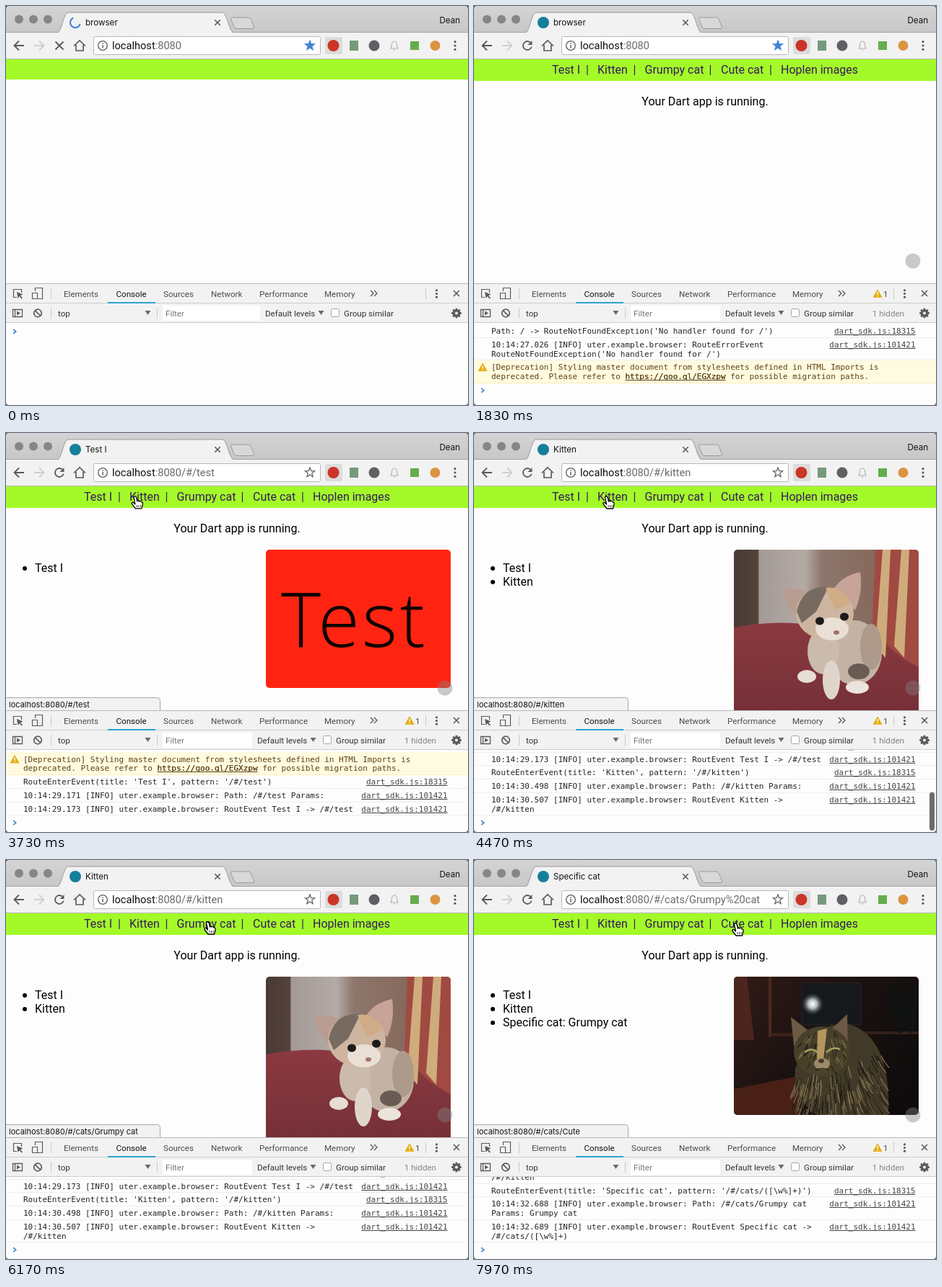
Recreate the animation shown at these times as an HTML page with a canvas. Size 640x554 px, loop 8000 ms.

```html
<!DOCTYPE html>
<html lang="en">
<head>
<meta charset="utf-8">
<title>Router demo</title>
<style>
  html, body { margin: 0; width: 100%; height: 100%; overflow: hidden; background: #fdfdfd; }
  canvas { display: block; width: 640px; height: 554px; }
</style>
</head>
<body>
<canvas id="stage"></canvas>
<script>
const LOOP = 8000;
const W = 640, H = 554;
const canvas = document.getElementById('stage');
const scale = window.devicePixelRatio || 1;
canvas.width = W * scale;
canvas.height = H * scale;
const g = canvas.getContext('2d');

const PAPER = '#fdfdfd', BAR = '#f2f2f2', EDGE = '#b8b8b8', ICON = '#5a5a5a', LINK = '#351a5e';
const UI = '11.6px Roboto, sans-serif';
const TAB = '11.6px Inter, sans-serif';
const STATUS = '11px Inter, sans-serif';
const URL_FONT = '14.6px Roboto, sans-serif';
const PAGE = '16px Roboto, sans-serif';
const MONO = '11px "DejaVu Sans Mono", monospace';

// Moments of the story, in ms
const SHOWN = 780, LOADED = 880, TEST = 3025, KITTEN = 4352, GRUMPY = 6542;

const pages = [
  { at: 0, title: 'browser', path: '' },
  { at: TEST, title: 'Test I', path: '/#/test', item: 'Test I', photo: drawTestCard },
  { at: KITTEN, title: 'Kitten', path: '/#/kitten', item: 'Kitten', photo: drawKitten },
  { at: GRUMPY, title: 'Specific cat', path: '/#/cats/Grumpy%20cat',
    item: 'Specific cat: Grumpy cat', photo: drawGrumpy }
];

const links = [
  ['Test I', 108], ['Kitten', 171], ['Grumpy cat', 236.5], ['Cute cat', 342], ['Hoplen images', 425]
];

const hovers = [
  [2480, '/#/test'], [3760, '/#/kitten'], [5960, '/#/cats/Grumpy cat'], [7560, '/#/cats/Cute']
];

const SDK = 'dart_sdk.js:18315', LOG = 'dart_sdk.js:101421';
const app = 'uter.example.browser:';
const rows = [
  { at: LOADED, text: ["Path: / -> RouteNotFoundException('No handler found for /')"], link: SDK },
  { at: LOADED, text: [`10:14:27.026 [INFO] ${app} RouteErrorEvent`,
    "RouteNotFoundException('No handler found for /')"], link: LOG },
  { at: LOADED, warn: true, text: [
    '[Deprecation] Styling master document from stylesheets defined in HTML Imports is',
    'deprecated. Please refer to https://goo.gl/EGXzpw for possible migration paths.'] },
  { at: TEST, text: ["RouteEnterEvent(title: 'Test I', pattern: '/#/test')"], link: SDK },
  { at: TEST, text: [`10:14:29.171 [INFO] ${app} Path: /#/test Params:`], link: LOG },
  { at: TEST, text: [`10:14:29.173 [INFO] ${app} RoutEvent Test I -> /#/test`], link: LOG },
  { at: KITTEN, text: ["RouteEnterEvent(title: 'Kitten', pattern: '/#/kitten')"], link: SDK },
  { at: KITTEN, text: [`10:14:30.498 [INFO] ${app} Path: /#/kitten Params:`], link: LOG },
  { at: KITTEN, text: [`10:14:30.507 [INFO] ${app} RoutEvent Kitten ->`, '/#/kitten'], link: LOG },
  { at: GRUMPY, text: ["RouteEnterEvent(title: 'Specific cat', pattern: '/#/cats/([\\w%]+)')"], link: SDK },
  { at: GRUMPY, text: [`10:14:32.688 [INFO] ${app} Path: /#/cats/Grumpy cat`, 'Params: Grumpy cat'], link: LOG },
  { at: GRUMPY, text: [`10:14:32.689 [INFO] ${app} RoutEvent Specific cat ->`, '/#/cats/([\\w%]+)'], link: LOG }
];

// Pointer tip: time, x, y
const track = [
  [1900, 215, 384], [2450, 122, 87], [3440, 122, 87], [3790, 183, 88],
  [5600, 183, 88], [6000, 279, 86], [7200, 279, 86], [7640, 362, 88], [8000, 362, 88]
];

function text(s, x, y, font, color = '#222', align = 'left') {
  g.font = font;
  g.fillStyle = color;
  g.textAlign = align;
  g.fillText(s, x, y);
}

function rect(x, y, w, h, color) {
  g.fillStyle = color;
  g.fillRect(x, y, w, h);
}

function box(x, y, w, h, r, fill, stroke) {
  g.beginPath();
  g.roundRect(x, y, w, h, r);
  paint(fill, stroke);
}

function oval(x, y, rx, ry, fill, stroke, width) {
  g.beginPath();
  g.ellipse(x, y, rx, ry, 0, 0, 7);
  paint(fill, stroke, width);
}

function dot(x, y, r, fill, stroke, width) {
  oval(x, y, r, r, fill, stroke, width);
}

function paint(fill, stroke, width = 1) {
  if (fill) { g.fillStyle = fill; g.fill(); }
  if (stroke) { g.strokeStyle = stroke; g.lineWidth = width; g.stroke(); }
}

function shape(d, fill, stroke, width = 1, x = 0, y = 0) {
  const path = new Path2D(d);
  g.save();
  g.translate(x, y);
  if (fill) { g.fillStyle = fill; g.fill(path); }
  if (stroke) { g.strokeStyle = stroke; g.lineWidth = width; g.stroke(path); }
  g.restore();
}

function linear(x0, y0, x1, y1, ...stops) {
  const fill = g.createLinearGradient(x0, y0, x1, y1);
  for (const [at, color] of stops) fill.addColorStop(at, color);
  return fill;
}

function cross(x, y, r, color = ICON, width = 1.6) {
  shape(`M${-r} ${-r}L${r} ${r}M${r} ${-r}L${-r} ${r}`, null, color, width, x, y);
}

function menuDots(x, y, gap) {
  for (const k of [-1, 0, 1]) dot(x, y + k * gap, 1.6, ICON);
}

function star(x, y, filled) {
  g.beginPath();
  for (let i = 0; i < 10; i++) {
    const a = -Math.PI / 2 + i * Math.PI / 5, r = i % 2 ? 2.9 : 7;
    g.lineTo(x + r * Math.cos(a), y + r * Math.sin(a));
  }
  g.closePath();
  paint(filled ? '#4285d4' : null, filled ? '#4285d4' : ICON, 1.2);
}

function warning(x, y) {
  shape('M0 -5.5L5.8 4.8H-5.8Z', '#e6ad10', '#e6ad10', 1, x, y);
  rect(x - 0.7, y - 2.5, 1.4, 4, '#fff');
  rect(x - 0.7, y + 2.5, 1.4, 1.4, '#fff');
}

function drawTabStrip(t, page) {
  rect(0, 0, W, 37, linear(0, 0, 0, 37, [0, '#d4d4d5'], [1, '#c7c7c9']));
  for (const x of [18, 38, 58]) dot(x, 18.5, 6, '#868686');
  rect(0, 36, W, 1, '#a2a2a2');
  shape('M72 37C77 36 80 9 86 9H300C306 9 309 36 315 37Z', BAR);
  shape('M72 36.5C77 35 80 9 86 9H300C306 9 309 35 315 36.5', null, '#999', 1);
  shape('M313 16H335Q338 16 339 18L343.5 29Q344 31.5 341 31.5H320Q317 31.5 316 29L311.5 18.5Q311 16 313 16Z',
    '#d8d8d9', '#9b9b9b');
  if (t < LOADED) {
    const a = t / 1000 * 2 * Math.PI;
    g.beginPath();
    g.arc(96, 23, 7, a + 0.3, a + 4.3);
    paint(null, '#4a80dc', 2.2);
  } else {
    dot(96, 23, 8, '#147f9c');
  }
  text(page.title, 110, 27, TAB, '#111');
  cross(293, 23, 3.7);
  text('Dean', 629, 24, TAB, '#111', 'right');
}

function drawToolbar(t, page) {
  rect(0, 37, W, 37, BAR);
  rect(0, 73, W, 1, EDGE);
  shape('M25 55H12M18 48.5L11.5 55L18 61.5', null, ICON, 1.8);
  shape('M39 55H52M46 48.5L52.5 55L46 61.5', null, '#cfcfcf', 1.8);
  if (t < LOADED) {
    cross(74, 55, 5.5, ICON, 1.9);
  } else {
    g.beginPath();
    g.arc(74, 55, 6, 0.3, 5.4);
    paint(null, ICON, 1.8);
    shape('M80.5 48V54H74.5Z', ICON);
  }
  shape('M94 55.5L102 48L110 55.5M97 54V62H107V54', null, ICON, 1.7);
  box(121.5, 42.5, 314, 25, 2, '#fff', EDGE);
  dot(134, 55, 6.3, null, ICON, 1.3);
  rect(133.3, 54, 1.5, 4.5, ICON);
  rect(133.3, 51.3, 1.5, 1.5, ICON);
  text('localhost', 147, 60, URL_FONT, '#111');
  text(':8080' + page.path, 147 + g.measureText('localhost').width, 60, URL_FONT, '#6a6a6a');
  star(421, 55, !page.path);

  box(442, 43, 24, 24, 2, '#dcdcdc');
  dot(453.5, 55, 8, '#cb3426');
  rect(476, 48, 12, 14, '#759a7c');
  dot(510, 55, 7.5, '#5f6064');
  shape('M-5 4Q-3.5 2 -3.5 -2Q-3 -6 0 -6Q3 -6 3.5 -2Q3.5 2 5 4ZM-1.5 6H1.5', null, '#b5b5b5', 1.2, 538, 55);
  rect(560, 49, 12, 12, '#64ad4e');
  dot(594.5, 55, 7, '#dc9440');
  menuDots(622, 55, 5.3);
}

function drawPage(t, page) {
  rect(0, 74, W, 311, PAPER);
  const shown = t >= SHOWN;
  rect(0, 74, W, shown ? 30 : 28, '#a3fa28');
  if (!shown) return;
  for (const [label, x] of links) text(label, x, 94, PAGE, LINK);
  for (const x of [157, 222.5, 327.5, 411]) text('|', x, 94, PAGE, LINK, 'center');
  text('Your Dart app is running.', 320, 138, PAGE, '#000', 'center');
  pages.filter(p => p.item && t >= p.at).forEach((p, i) => {
    dot(26, 188 + i * 19, 3, '#000');
    text(p.item, 40, 193 + i * 19, PAGE, '#000');
  });
  if (page.photo) {
    g.save();
    g.beginPath();
    g.rect(0, 74, W, 311);
    g.clip();
    g.beginPath();
    g.roundRect(360, 162, 256, page.photo === drawKitten ? 256 : 192, 5);
    g.clip();
    page.photo();
    g.restore();
  }
  if (t >= LOADED) dot(608, 354, 10.5, 'rgba(128,128,128,.42)');
}

function drawTestCard() {
  rect(360, 162, 256, 192, '#ff2412');
  g.letterSpacing = '3.5px';
  text('Test', 381, 297, '300 105px "Open Sans", sans-serif', '#100400');
  g.letterSpacing = '0px';
}

function drawKitten() {
  rect(360, 162, 256, 230, linear(360, 0, 556, 0,
    [0, '#493a34'], [0.17, '#54423a'], [0.18, '#a39a96'], [0.5, '#b4aaa5'], [0.62, '#8d776d'], [1, '#86695c']));
  const couch = linear(0, 258, 0, 385, [0, '#8c3a40'], [1, '#763038']);
  shape('M360 270Q420 258 480 268L560 270L616 300V392H360Z', couch);
  shape('M556 162H616V325Q575 305 552 268Z', '#a04a42');
  for (const x of [566, 592]) shape('M0 162H11L4 312L-10 296Z', '#cfac7c', null, 1, x);

  oval(527, 305, 38, 45, '#c4b3a4');
  oval(550, 297, 15, 32, '#ad9a8b');
  oval(484, 303, 22, 32, '#cbbbad');
  oval(533, 331, 15, 11, '#6a5c55');
  oval(461, 338, 13, 9, '#e6ddd5');
  oval(495, 343, 12, 27, '#dfd5cb');
  oval(531, 353, 16, 9, '#ece4dc');
  shape('M428 217Q450 213 472 224L450 258Q432 244 428 217Z', '#b99c90');
  shape('M535 193Q510 198 498 217L528 246Q539 222 535 193Z', '#c7a497');
  oval(486, 250, 40, 36, '#cdb5a0');
  shape('M447 248Q455 211 491 214L474 248L454 264Z', '#776b61');
  shape('M487 215Q513 212 522 236L500 246Z', '#cfac86');
  oval(496, 272, 23, 16, '#e9dfd4');
  oval(479, 261, 6, 5.5, '#1c1a1a');
  oval(513, 255, 6, 5.5, '#1c1a1a');
  oval(502, 277, 4, 3, '#a3726b');
}

function drawGrumpy() {
  rect(360, 162, 256, 192, linear(360, 162, 616, 354, [0, '#321a15'], [0.45, '#1a1211'], [1, '#0d0a0a']));
  shape('M360 162H378L388 250H360Z', '#4c261e');
  shape('M360 318L450 300V354H360Z', '#482016');
  rect(408, 162, 4, 84, '#4c2a20');
  rect(412, 240, 125, 5, '#3b2119');
  rect(540, 238, 76, 4, '#33201a');
  box(454, 171, 82, 58, 2, '#16191c', '#272526');
  const glow = g.createRadialGradient(469, 200, 1, 469, 200, 16);
  glow.addColorStop(0, '#f6f8f8');
  glow.addColorStop(0.35, '#b4babd');
  glow.addColorStop(1, 'rgba(34,38,40,0)');
  rect(450, 181, 38, 38, glow);
  for (let i = 0; i < 7; i++) oval(580 + i * 5, 194 + i % 3 * 13, 7, 20, '#111312');

  shape('M475 354Q440 330 445 290Q468 222 520 228Q578 246 574 354Z', '#423a29');
  shape('M439 218L466 239L444 266ZM517 214L492 238L518 267Z', '#6d5a45');
  oval(482, 266, 39, 35, '#494029');
  let seed = 17;
  const rnd = () => (seed = seed * 16807 % 2147483647) / 2147483647;
  const tones = ['#827250', '#2c271c', '#685a3d', '#1d1a15'];
  const tuft = (x, y, length, color) => shape(
    `M0 0Q${(x - 490) * 0.05} ${length / 2} ${(x - 490) * 0.15} ${length}`, null, color, 1.3, x, y);
  for (let i = 0; i < 190; i++) {
    const x = 445 + rnd() * 120;
    const top = 292 + Math.max(0, 505 - x) * 0.15 - Math.max(0, x - 505) * 0.5;
    tuft(x, top + rnd() * (348 - top), 17, tones[i % 4]);
  }
  for (let i = 0; i < 60; i++) {
    const a = rnd() * 7, r = Math.sqrt(rnd());
    tuft(482 + 35 * r * Math.cos(a), 262 + 29 * r * Math.sin(a), 7, tones[i % 4]);
  }
  shape('M476 237L489 234L484 277L475 278Z', '#b3965f');
  shape('M458 267Q468 259 477 268M488 267Q498 258 507 263', null, '#a9a55d', 2.5);
  oval(482, 283, 11, 8, '#9b8b69');
  oval(481, 279, 4, 3, '#4c352b');
  shape('M473 292Q482 287 491 292', null, '#241e16', 1.5);
}

function drawStatus(t) {
  const hover = hovers.filter(h => t >= h[0]).pop();
  if (!hover) return;
  box(-0.5, 367.5, 214, 18, [0, 4, 0, 0], BAR, '#a8a8a8');
  text('localhost:8080' + hover[1], 4, 380.5, STATUS, '#111');
}

function drawDevtools(t) {
  const loaded = t >= LOADED;
  rect(0, 385, W, 55, BAR);
  for (const y of [385, 412, 439]) rect(0, y, W, 1, '#cdcdcd');
  rect(0, 385, W, 1, EDGE);
  shape('M21.5 398V393.5H10.5V404.5H15', null, ICON, 1.2);
  shape('M15 397L23.5 400.5L20 402L23 405.5L21.5 406.5L18.5 403L16.5 406Z', ICON);
  shape('M40.5 396V391.5H50.5V406.5H44M36.5 398.5H43.5V406.5H36.5Z', null, ICON, 1.2);
  const tabs = [['Elements', 80], ['Console', 152.5], ['Sources', 218], ['Network', 284],
    ['Performance', 351], ['Memory', 441]];
  for (const [label, x] of tabs) text(label, x, 404, UI, label === 'Console' ? '#111' : '#4b4b4b');
  rect(141, 411, 66, 2, '#2ba3cf');
  shape('M505 395L509 399L505 403M510 395L514 399L510 403', null, ICON, 1.4);
  if (loaded) {
    warning(559, 399.5);
    text('1', 567, 404, UI, '#4b4b4b');
  }
  for (const [x, y] of [[62, 392], [581, 392], [62, 419], [209, 419]]) rect(x, y, 1, 15, '#cacaca');
  menuDots(596.5, 399.5, 4.7);
  cross(624, 399, 4);

  shape('M9.5 421.5H22.5V431.5H9.5ZM12.5 421.5V431.5', null, ICON, 1.3);
  shape('M15 423.5L20 426.5L15 429.5Z', ICON);
  dot(44, 426.5, 5.3, null, ICON, 1.7);
  shape('M40.3 422.8L47.7 430.2', null, ICON, 1.7);
  text('top', 72, 431, UI, '#333');
  const down = x => shape('M-4 -3H4L0 3Z', '#6b6b6b', null, 1, x, 426);
  down(196.5);
  const shift = loaded ? -11 : 0;
  rect(217, 416, 135 + shift, 21, '#fff');
  text('Filter', 221, 431, UI, '#757575');
  text('Default levels', 359 + shift, 431, UI, '#333');
  down(436.5 + shift);
  box(450.5 + shift, 420.5, 11, 11, 2, '#fff', '#a5a5a5');
  text('Group similar', 468 + shift, 431, UI, '#333');
  if (loaded) text('1 hidden', 596, 431, UI, '#858585', 'right');
  for (let i = 0; i < 4; i++) {
    const a = i * Math.PI / 4, x = 6.8 * Math.cos(a), y = 6.8 * Math.sin(a);
    shape(`M${-x} ${-y}L${x} ${y}`, null, ICON, 2.8, 624, 426.5);
  }
  dot(624, 426.5, 5.2, ICON);
  dot(624, 426.5, 2, BAR);
}

function underlined(s, x, y, color) {
  text(s, x, y, MONO, color);
  rect(x, y + 1, g.measureText(s).width, 1, color);
}

function drawConsole(t) {
  const line = 12.7, pad = 6.05, top = 442.2, bottom = 540.8;
  const heightOf = row => row.text.length * line + pad;
  const visible = rows.filter(row => t >= row.at);
  const prompt = top + visible.reduce((sum, row) => sum + heightOf(row), 0) + 9.4;
  let y = top - Math.max(0, prompt - bottom);
  rect(0, 440, W, H - 440, PAPER);
  g.save();
  g.beginPath();
  g.rect(0, 440, W, H - 440);
  g.clip();
  for (const row of visible) {
    const h = heightOf(row);
    const baseline = i => Math.floor(y + 13.4 + i * line);
    const ink = row.warn ? '#5c4314' : '#252525';
    if (row.warn) {
      rect(0, Math.floor(y), W, Math.floor(h), '#fffbe0');
      warning(12, y + 9.5);
    }
    rect(0, Math.floor(y + h - 0.5), W, 1, row.warn ? '#fff0b8' : '#eee');
    row.text.forEach((s, i) => {
      text(s, 24, baseline(i), MONO, ink);
      const url = s.match(/https:\S+/);
      if (url) underlined(url[0], 24 + g.measureText(s.slice(0, url.index)).width, baseline(i), ink);
    });
    if (row.link) underlined(row.link, 611.5 - g.measureText(row.link).width, baseline(0), '#444');
    y += h;
  }
  shape('M-2 -3L1.8 0L-2 3', null, '#4285d0', 1.6, 12, y + 9.8);
  const since = t - Math.max(...pages.map(p => p.at && t >= p.at ? p.at : -LOOP));
  const alpha = Math.min(1, Math.max(0, (690 - since) / 150));
  if (alpha) {
    const size = 108 * 114 / (prompt - 440 + 13);
    box(631, 552 - size, 7, size, 3.5, `rgba(60,60,60,${0.75 * alpha})`);
  }
  g.restore();
}

function drawPointer(t) {
  if (t < track[0][0]) return;
  const i = Math.max(1, track.findIndex(k => t < k[0]));
  const [t0, x0, y0] = track[i - 1], [t1, x1, y1] = track[i];
  const p = (t - t0) / (t1 - t0), ease = p * p * (3 - 2 * p);
  const x = x0 + (x1 - x0) * ease, y = y0 + (y1 - y0) * ease;
  g.font = PAGE;
  const over = y > 78 && y < 100 && links.some(([s, left]) => x > left && x < left + g.measureText(s).width);
  g.lineJoin = 'round';
  if (over) {
    shape('M-1.5 1Q0 -1.5 2 1L3.5 7Q5 5 6 7Q8 5.5 9 8Q11.5 7.5 11 11L9.5 17H1L-4 10.5Q-4.5 8 -2 8.5L0.5 11Z',
      '#fff', '#000', 1.3, x, y);
    shape('M3 12V15M5.5 12V15M8 12V15', null, '#000', 0.8, x, y);
  } else {
    shape('M0 0V15L3.5 12L6 17.5L8.5 16.5L6 11H11Z', '#000', '#fff', 1, x, y);
  }
  g.lineJoin = 'miter';
}

function draw(t) {
  const page = pages.filter(p => t >= p.at).pop();
  g.setTransform(scale, 0, 0, scale, 0, 0);
  rect(0, 0, W, H, '#4a4a4a');
  g.save();
  g.beginPath();
  g.roundRect(0, 0, W, H, 4);
  g.clip();
  drawTabStrip(t, page);
  drawToolbar(t, page);
  drawPage(t, page);
  drawStatus(t);
  drawDevtools(t);
  drawConsole(t);
  drawPointer(t);
  g.restore();
}

function tick() {
  draw(performance.now() % LOOP);
  requestAnimationFrame(tick);
}
tick();
</script>
</body>
</html>
```
